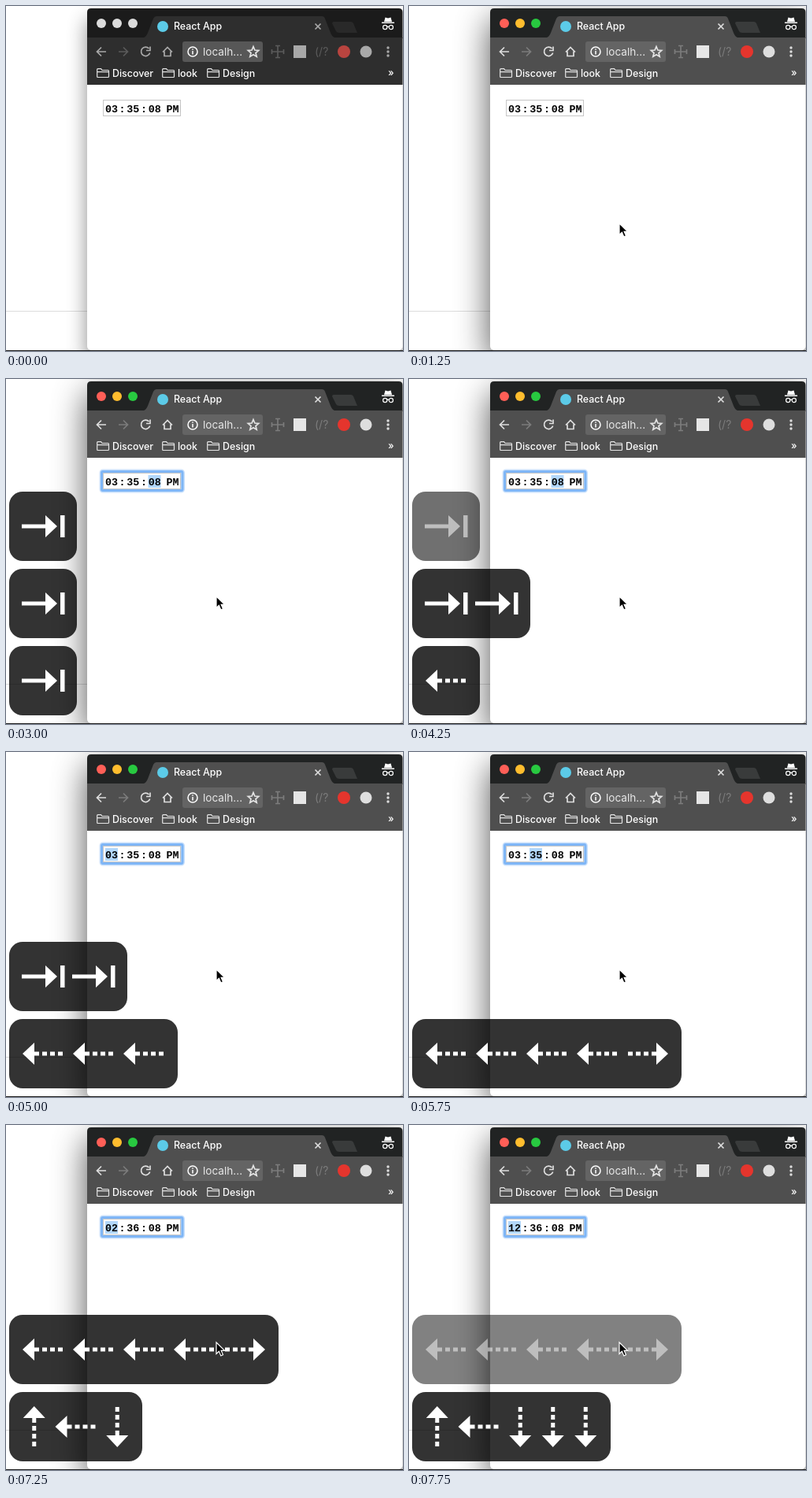
An HTML page that plays this animation: 504 px wide and 438 px high, repeating every 8 s.

```html
<!DOCTYPE html>
<html lang="en">
<head>
<meta charset="utf-8">
<title>Time input</title>
<style>
  html, body { margin: 0; width: 100%; height: 100%; overflow: hidden; background: #fff; }
  svg {
    display: block; font-family: Inter, sans-serif;
    --strip: #212323; --bar: #4f4f4f; --plus: #393b3b; --box: #646464; --icon: #dedede; --dim: #7c7c7c;
    --square: #e6e6e6; --stop: #e5352d; --red: #ff5f57; --yellow: #ffbd2e; --green: #28c940;
  }
  svg.idle {
    --strip: #1b1b1b; --bar: #2e2e2e; --plus: #292929; --box: #575757; --icon: #a9a9a9; --dim: #5b5b5b;
    --square: #a8a8a8; --stop: #b9443f; --red: #dcdcdc; --yellow: #dcdcdc; --green: #dcdcdc;
  }
  .shadow { filter: blur(22px); opacity: .68; }
  .idle .shadow { filter: blur(13px); opacity: .45; }
  .line { fill: none; stroke: var(--icon); stroke-width: 1.7; }
  .dim { stroke: var(--dim); }
  .label { fill: #fff; font-size: 12.4px; font-weight: 500; }
  .time { font: bold 13.33px "Liberation Mono", monospace; }
</style>
</head>
<body>
<svg id="stage" width="504" height="438" viewBox="0 0 504 438">
  <defs>
    <path id="folder" d="M.7 10.5V1.7Q.7.7 1.7.7H5.6L7 2.5H14.5Q15.5 2.5 15.5 3.5V10.5Q15.5 11.5 14.5 11.5H1.7Q.7 11.5 .7 10.5ZM.7 4.6H15.5" fill="none" stroke="#e4e4e4" stroke-width="1.2"/>
    <path id="tabKey" d="M-27-2.5H3V-14L18 0L3 14V2.5H-27ZM22-14H27.5V14H22Z"/>
    <path id="arrowKey" d="M-26 0L-11-14V14ZM-11-2.5H-5V2.5H-11ZM-1-2.5H5V2.5H-1ZM9-2.5H15V2.5H9ZM19-2.5H25V2.5H19Z"/>
  </defs>

  <path d="M0 387.5H104" stroke="#dcdcdc"/>
  <rect class="shadow" x="103" y="18" width="401" height="434"/>
  <path d="M0 437.5H504" stroke="#1c1c1c"/>

  <!-- browser window -->
  <rect x="103" y="3" width="400.5" height="434" rx="5" fill="#fff"/>
  <path d="M103 41V8Q103 3 108 3H498.5Q503.5 3 503.5 8V41Z" fill="var(--strip)"/>
  <path d="M103 40H175Q178 39 180 34L187 16Q188.5 13 191 13H401Q404 13 405 16L412 34Q414 39 417 40H503.5V100H103Z" fill="var(--bar)"/>
  <path d="M416 20H438Q440 20 441 22L446 34H423Q420 34 419 32L414 22Q414 20 416 20Z" fill="var(--plus)"/>
  <circle cx="121" cy="22" r="6" fill="var(--red)"/>
  <circle cx="141" cy="22" r="6" fill="var(--yellow)"/>
  <circle cx="161" cy="22" r="6" fill="var(--green)"/>
  <circle cx="199" cy="26" r="7" fill="#5ccbe8"/>
  <text class="label" x="213" y="30">React App</text>
  <path class="line" d="M392.5 22.5L399.5 29.5M399.5 22.5L392.5 29.5" stroke-width="1.4"/>
  <path d="M477 20.5H493V22H477ZM480 20L481.5 14.5L485 15.5L488.5 14.5L490 20Z" fill="#fff"/>
  <path d="M483.8 26.5Q485 25.6 486.2 26.5M478.6 27a2.6 2.6 0 1 0 5.2 0a2.6 2.6 0 1 0-5.2 0M486.2 27a2.6 2.6 0 1 0 5.2 0a2.6 2.6 0 1 0-5.2 0" fill="none" stroke="#fff" stroke-width="1.2"/>

  <!-- toolbar -->
  <path class="line" d="M127 58H116M121 52.5L115.5 58L121 63.5"/>
  <path class="line dim" d="M143 58H154M149 52.5L154.500 58L149 63.5"/>
  <path class="line" d="M181.500 54A5.700 5.700 0 1 0 182.700 59.500M183 51.500V56.500H178"/>
  <path class="line" d="M199 58.500L205 52.500L211 58.500M201 57.500V63.500H209V57.500"/>
  <rect x="224" y="45" width="102" height="26" rx="3" fill="var(--box)"/>
  <circle cx="237" cy="58" r="6" fill="none" stroke="#fff" stroke-width="1.5"/>
  <path d="M237 57V61.500M237 54.200V55.800" stroke="#fff" stroke-width="1.5"/>
  <text x="250" y="63" font-size="13.6" fill="#e8e8e8">localh...</text>
  <path class="line" stroke-width="1.4" style="stroke:#e4e4e4" d="M314 51.500L315.900 56L320.700 56.400L317 59.500L318.200 64.200L314 61.700L309.800 64.200L311 59.500L307.300 56.400L312.100 56Z"/>
  <path class="line dim" d="M345 50V66M337 58H353M342 50.500H348M342 65.500H348M337.500 55V61M352.500 55V61"/>
  <rect x="365" y="50" width="16" height="16" fill="var(--square)"/>
  <text x="392" y="63" font-size="14" fill="var(--dim)">(/?</text>
  <circle cx="429" cy="58" r="8" fill="var(--stop)"/>
  <circle cx="457" cy="58" r="7.500" fill="var(--icon)"/>
  <g fill="var(--icon)"><circle cx="485" cy="53" r="1.700"/><circle cx="485" cy="58" r="1.700"/><circle cx="485" cy="63" r="1.700"/></g>

  <!-- bookmarks -->
  <use href="#folder" x="115" y="79"/><text class="label" x="135" y="90">Discover</text>
  <use href="#folder" x="198" y="79"/><text class="label" x="218" y="90">look</text>
  <use href="#folder" x="255" y="79"/><text class="label" x="275" y="90">Design</text>
  <text class="label" x="485" y="89">»</text>

  <!-- time input -->
  <g id="ring" fill="none">
    <rect x="121" y="117" width="103.500" height="25" rx="2" stroke="#c9e0fb" stroke-width="5"/>
    <rect x="121.500" y="117.500" width="102.500" height="24" rx="1.500" stroke="#7fb6f6" stroke-width="3"/>
  </g>
  <rect x="123.500" y="119.500" width="98" height="20" fill="#fff" stroke="#c6c6c6"/>
  <rect id="mark" y="122" width="16" height="16" fill="#b2d7fb"/>
  <g class="time">
    <text id="hour" x="126" y="134.500"></text><text x="143.500" y="134.500">:</text>
    <text id="minute" x="153.300" y="134.500"></text><text x="171" y="134.500">:</text>
    <text x="180.800" y="134.500">08</text><text x="203.500" y="134.500">PM</text>
  </g>

  <g id="keys"></g>
  <path id="cursor" d="M0 0V14.500L3.400 11.300L5.800 17L8.500 15.800L6.100 10.300H10.500Z" fill="#000" stroke="#fff" stroke-width="1.200"/>
</svg>
<script>
const LOOP = 8000;
const FIELD_X = [126, 153, 180.5, 203.5];
const SLOT_CENTER = 383, SLOT_STEP = 98;

// T = tab, L R U D = arrows; each key has the time it is pressed
const rows = [
  { keys: 'T', times: [1750], fade: 3750, gone: 3750 },
  { keys: 'T', times: [2250], fade: 4250, gone: 4500, dim: 0.7 },
  { keys: 'TT', times: [3000, 3500], fade: 5500, gone: 5750, dim: 0.65 },
  { keys: 'LLLLR', times: [4250, 4500, 5000, 5500, 5750], fade: 7750, gone: 8000, dim: 0.62 },
  { keys: 'ULDDD', times: [6250, 6750, 7250, 7500, 7750], fade: 9750, gone: 10000 },
];
const turn = { T: 0, L: 0, R: 180, U: 90, D: 270 };
const keyWidth = key => 'UD'.includes(key) ? 41.5 : 64;
const byId = id => document.getElementById(id);
const show = (node, visible) => node.setAttribute('visibility', visible ? 'visible' : 'hidden');
const twoDigits = n => String(n).padStart(2, '0');

function inputState(t) {
  const state = { field: -1, hour: 3, minute: 35 };
  for (const { keys, times } of rows) {
    [...keys].forEach((key, i) => {
      if (t < times[i]) return;
      if (key === 'T' || key === 'R') state.field++;
      if (key === 'L') state.field = Math.max(0, state.field - 1);
      if (key === 'U') state.minute++;
      if (key === 'D') state.hour = (state.hour + 10) % 12 + 1;
    });
  }
  return state;
}

function drawRow(row, slot, t) {
  const level = t < row.fade ? 1 : row.dim;
  const y = SLOT_CENTER - slot * SLOT_STEP;
  let x = 15, glyphs = '';
  [...row.keys].forEach((key, i) => {
    if (t < row.times[i]) return;
    const width = keyWidth(key);
    const shape = key === 'T' ? 'tabKey' : 'arrowKey';
    glyphs += `<use href="#${shape}" transform="translate(${x + width / 2} ${y}) rotate(${turn[key]})"/>`;
    x += width;
  });
  return `<rect x="4" y="${y - 44}" width="${x + 7}" height="88" rx="17" fill-opacity="${0.8 * level}"/>
    <g fill="#fff" fill-opacity="${level === 1 ? 1 : level * 0.78}">${glyphs}</g>`;
}

function render(t) {
  const { field, hour, minute } = inputState(t);
  byId('stage').classList.toggle('idle', t < 1250);
  byId('hour').textContent = twoDigits(hour);
  byId('minute').textContent = twoDigits(minute);
  show(byId('ring'), field >= 0);
  show(byId('mark'), field >= 0);
  byId('mark').setAttribute('x', FIELD_X[Math.max(0, field)]);

  const started = rows.filter(row => t >= row.times[0]);
  byId('keys').innerHTML = started
    .map((row, i) => t < row.gone ? drawRow(row, started.length - 1 - i, t) : '')
    .join('');

  show(byId('cursor'), t >= 750);
  byId('cursor').setAttribute('transform', `translate(267 ${t < 1000 ? 228 : 276})`);
}

const start = performance.now();
function tick() {
  render((performance.now() - start) % LOOP);
  requestAnimationFrame(tick);
}
tick();
</script>
</body>
</html>
```
